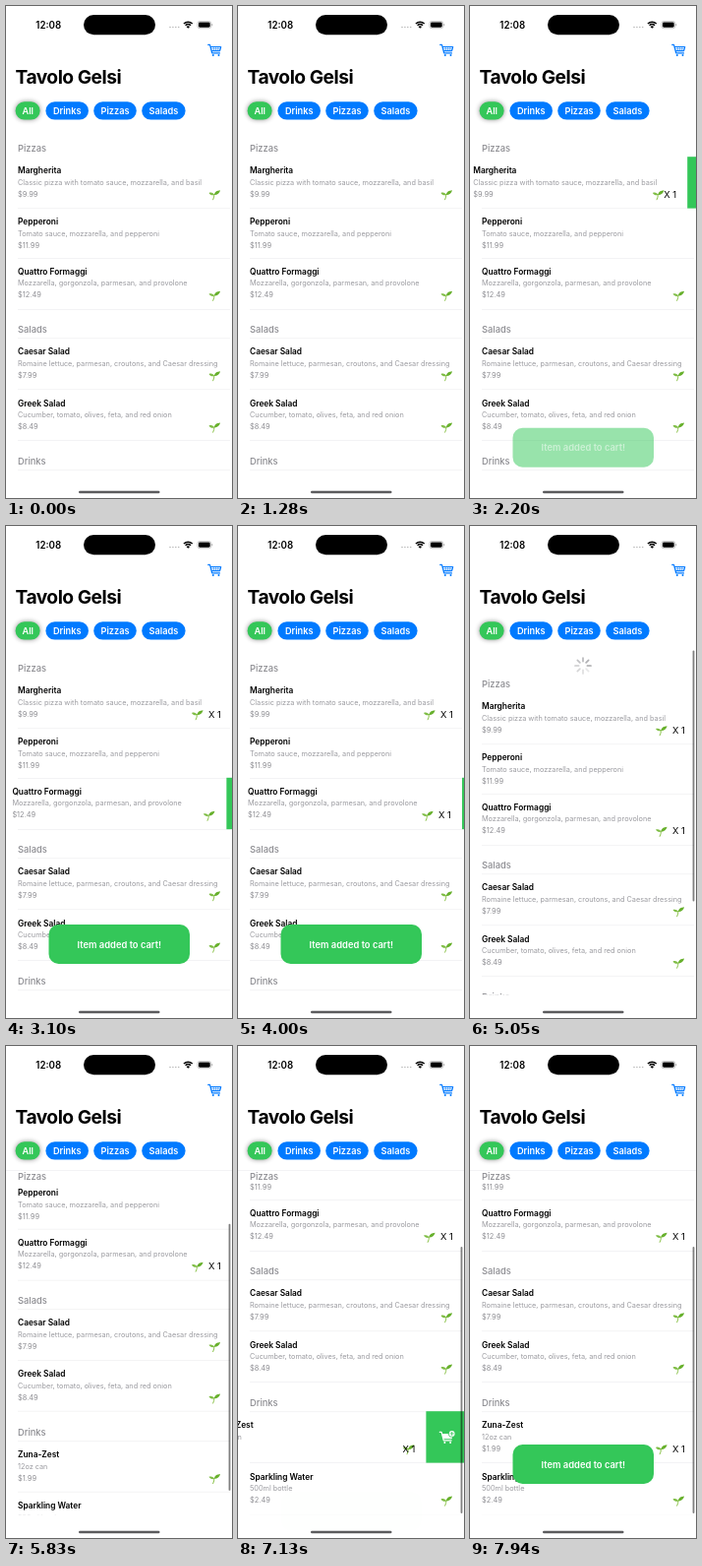
An HTML page with a canvas for the animation above (8000 ms loop, 230 by 500 pixels).

```html
<!DOCTYPE html>
<html lang="en">
<head>
<meta charset="utf-8">
<title>Menu</title>
<style>
  html, body { margin: 0; width: 100%; height: 100%; overflow: hidden; background: #fff; }
  canvas { display: block; width: 230px; height: 500px; }
</style>
</head>
<body>
<canvas id="stage"></canvas>
<script>
const W = 230, H = 500, LOOP = 8000;
const GREEN = '#34c759', BLUE = '#007aff', BLACK = '#000', WHITE = '#fff';
const LIST = { top: 126, bottom: 476.3 };
const BUTTON = 38.6;
const canvas = document.getElementById('stage');
const ctx = canvas.getContext('2d');
const dpr = window.devicePixelRatio || 1;
canvas.width = W * dpr;
canvas.height = H * dpr;

const headers = [['Pizzas', 145], ['Salads', 329], ['Drinks', 463]];
const separators = [205.5, 256, 308, 337.5, 389.5, 441, 471.5, 523, 576];

// y is the middle of the item name; swipe and tap are times in ms
const items = [
  { y: 167.2, name: 'Margherita', info: 'Classic pizza with tomato sauce, mozzarella, and basil', price: '$9.99', veg: true, swipe: 1270, tap: 2035 },
  { y: 219.2, name: 'Pepperoni', info: 'Tomato sauce, mozzarella, and pepperoni', price: '$11.99' },
  { y: 269.8, name: 'Quattro Formaggi', info: 'Mozzarella, gorgonzola, parmesan, and provolone', price: '$12.49', veg: true, swipe: 3000, tap: 3740 },
  { y: 351.2, name: 'Caesar Salad', info: 'Romaine lettuce, parmesan, croutons, and Caesar dressing', price: '$7.99', veg: true },
  { y: 403.6, name: 'Greek Salad', info: 'Cucumber, tomato, olives, feta, and red onion', price: '$8.49', veg: true },
  { y: 485.2, name: 'Zuna-Zest', info: '12oz can', price: '$1.99', veg: true, swipe: 6510, tap: 7110 },
  { y: 537.6, name: 'Sparkling Water', info: '500ml bottle', price: '$2.49', veg: true }
];
const toasts = [[2035, 4035], [7120, 9120]];
const scrollKeys = [[4700, 0], [5050, 16], [5230, 20], [5450, 9], [5600, -6], [5830, -70], [5960, -90], [6100, -98], [6250, -100]];

const clamp = v => Math.max(0, Math.min(1, v));
const smooth = v => { v = clamp(v); return v * v * (3 - 2 * v); };

function track(keys, t) {
  if (t <= keys[0][0]) return keys[0][1];
  for (let i = 1; i < keys.length; i++) {
    const [t0, a] = keys[i - 1], [t1, b] = keys[i];
    if (t < t1) return a + (b - a) * (t - t0) / (t1 - t0);
  }
  return keys[keys.length - 1][1];
}

function text(str, x, y, size, weight = 400, color = BLACK, align = 'left', spacing = 0) {
  ctx.font = `${weight} ${size}px Inter, sans-serif`;
  ctx.letterSpacing = spacing + 'px';
  ctx.fillStyle = color;
  ctx.textAlign = align;
  ctx.textBaseline = 'alphabetic';
  ctx.fillText(str, x, y + size * 0.36);
}

function rect(x, y, w, h, color) {
  ctx.fillStyle = color;
  ctx.fillRect(x, y, w, h);
}

function pill(x, y, w, h, r, color) {
  ctx.fillStyle = color;
  ctx.beginPath();
  ctx.roundRect(x, y, w, h, r);
  ctx.fill();
}

function dot(x, y, r, color) {
  ctx.fillStyle = color;
  ctx.beginPath();
  ctx.arc(x, y, r, 0, 7);
  ctx.fill();
}

function line(path, width, color) {
  ctx.lineWidth = width;
  ctx.strokeStyle = color;
  ctx.stroke(new Path2D(path));
}

function at(x, y, draw) {
  ctx.save();
  ctx.translate(x, y);
  draw();
  ctx.restore();
}

function cart(x, y, color, badge) {
  at(x, y, () => {
    ctx.lineJoin = ctx.lineCap = 'round';
    line('M-6.6 -5.4H-4.8L-2.6 3.2H5.2M-4.3 -3.2H6.4L5.3 1H-3.2', 1.2, color);
    if (badge) {
      ctx.fillStyle = color;
      ctx.fill(new Path2D('M-4.3 -3.2H6.4L5.3 1H-3.2Z'));
    } else {
      line('M-3.8 -1.1H5.8M-.9 -3V.8M1.3 -3V.8M3.5 -3V.8', 0.5, color);
    }
    dot(-1.5, 5.3, 1, color);
    dot(4.2, 5.3, 1, color);
    if (!badge) return;
    dot(5.8, -3.8, 3.6, GREEN);
    dot(5.8, -3.8, 2.9, color);
    line('M4.2 -3.8H7.4M5.8 -5.4V-2.2', 0.8, GREEN);
  });
}

function seedling(x, y) {
  at(x, y, () => {
    ctx.lineCap = 'round';
    line('M-1.6 5Q-.2 2.4 -.4 -.4', 1, '#8bc34a');
    ctx.fillStyle = '#7fbd45';
    ctx.fill(new Path2D('M-.4 .2C-2 1 -4.8 .4 -5.8 -1.8C-3.4 -2.8 -1 -1.8 -.4 .2Z'));
    ctx.fillStyle = '#67b02c';
    ctx.fill(new Path2D('M-.4 .2C-.2 -2.8 2.4 -4.4 5.8 -4.6C5 -1.6 2.6 .4 -.4 .2Z'));
  });
}

function statusBar() {
  text('12:08', 43.2, 19.2, 9.7, 600, BLACK, 'center');
  pill(79, 8.9, 73, 20.4, 10.2, BLACK);
  for (let i = 0; i < 4; i++) dot(167 + i * 2.9, 21.5, 0.8, '#b8b8b8');
  ctx.strokeStyle = BLACK;
  ctx.lineWidth = 1.5;
  ctx.lineCap = 'butt';
  for (const r of [3.8, 6.2]) {
    ctx.beginPath();
    ctx.arc(185.3, 22.4, r, -Math.PI * 0.75, -Math.PI * 0.25);
    ctx.stroke();
  }
  ctx.fillStyle = BLACK;
  ctx.fill(new Path2D('M185.3 22.8L183.5 20.9Q185.3 19.4 187.1 20.9Z'));
  ctx.strokeStyle = '#a5a5a5';
  ctx.lineWidth = 0.6;
  ctx.beginPath();
  ctx.roundRect(194.9, 15.5, 13.8, 7.2, 2.2);
  ctx.stroke();
  pill(195.9, 16.5, 11.8, 5.2, 1.4, BLACK);
  pill(209.3, 17.9, 0.9, 2.4, 0.4, '#a5a5a5');
}

function topBar() {
  cart(212.3, 44.7, BLUE);
  text('Tavolo Gelsi', 9.5, 72, 19.2, 700, BLACK, 'left', -0.5);
  ctx.save();
  ctx.shadowColor = 'rgba(0,0,0,.45)';
  ctx.shadowBlur = 5 * dpr;
  pill(9.6, 97.2, 25, 18.4, 9.2, GREEN);
  ctx.restore();
  text('All', 22.2, 106.4, 9.2, 600, WHITE, 'center');
  [['Drinks', 40.4, 43.6], ['Pizzas', 89.2, 43.6], ['Salads', 138.2, 44.4]].forEach(([label, x, w]) => {
    pill(x, 97.2, w, 18.4, 9.2, BLUE);
    text(label, x + w / 2, 106.4, 9.2, 600, WHITE, 'center');
  });
}

function swipeOffset(item, t) {
  if (!item.swipe || t < item.swipe) return 0;
  const k = (t - item.tap - 25) / 50;
  return k < 0 ? BUTTON * smooth((t - item.swipe) / 420) : BUTTON * (1 + k) * Math.exp(-k);
}

function drawItem(item, t) {
  const { y } = item;
  const shift = swipeOffset(item, t);
  if (shift > 0.1) {
    rect(W - shift, y - 14, shift, 52.4, GREEN);
    cart(W - shift + 20.5, y + 12.5, WHITE, true);
  }
  at(-shift, 0, () => {
    text(item.name, 12, y, 8.35, 600);
    text(item.info, 12, y + 12, 7.3, 400, '#9b9ba0');
    text(item.price, 12, y + 24, 7.4, 400, '#8e8e93');
    const added = t >= item.tap;
    const slide = added ? 17.5 * smooth((t - item.tap - 30) / 220) : 0;
    if (item.veg) seedling(212.3 - slide, y + 24.6);
    if (added) text('X 1', 206, y + 24.1, 9.4);
  });
}

function spinner(pull) {
  at(115, 142, () => {
    ctx.lineWidth = 1.7;
    ctx.lineCap = 'round';
    for (let i = 0; i < 8; i++) {
      const alpha = (0.12 + 0.33 * ((i + 5) % 8) / 7) * clamp(pull / 14);
      ctx.strokeStyle = `rgba(60,60,67,${alpha})`;
      ctx.beginPath();
      ctx.moveTo(0, -4.4);
      ctx.lineTo(0, -8);
      ctx.stroke();
      ctx.rotate(Math.PI / 4);
    }
  });
}

function scrollBar(scroll, t) {
  const alpha = 0.5 * clamp((t - 4680) / 150);
  if (!alpha) return;
  const length = 271 - Math.max(0, scroll);
  const top = LIST.top + 0.5 + Math.max(0, -scroll) * 0.775;
  pill(226.6, top, 1.8, length, 0.9, `rgba(0,0,0,${alpha})`);
}

function list(t) {
  const scroll = track(scrollKeys, t);
  ctx.save();
  ctx.beginPath();
  ctx.rect(0, LIST.top, W, LIST.bottom - LIST.top);
  ctx.clip();
  if (scroll > 0) spinner(scroll);
  at(0, scroll, () => {
    separators.forEach(y => rect(12, y, 216, 0.6, '#ececee'));
    items.forEach(item => drawItem(item, t));
  });
  if (scroll < -12) {
    rect(0, LIST.top, W, 13.5, WHITE);
    rect(0, LIST.top, W, 0.6, '#ececee');
  }
  headers.forEach(([label, y]) => text(label, 12, Math.max(133, y + scroll), 9.3, 550, '#8c8c91'));
  scrollBar(scroll, t);
  ctx.restore();
}

function toast(t) {
  for (const [show, hide] of toasts) {
    const visible = smooth((t - show) / 330) * (1 - smooth((t - hide) / 330));
    if (visible <= 0) continue;
    ctx.save();
    ctx.globalAlpha = visible;
    ctx.translate(0, 48 * (1 - visible));
    pill(43.5, 405, 143.5, 40, 10, GREEN);
    text('Item added to cart!', 115.3, 425.3, 9.4, 600, WHITE, 'center');
    ctx.restore();
  }
}

function frame(now) {
  const t = now % LOOP;
  ctx.setTransform(dpr, 0, 0, dpr, 0, 0);
  rect(0, 0, W, H, WHITE);
  statusBar();
  topBar();
  list(t);
  toast(t);
  pill(74, 492.7, 82.5, 2.6, 1.3, '#5c5c5e');
  requestAnimationFrame(frame);
}

requestAnimationFrame(frame);
</script>
</body>
</html>
```
